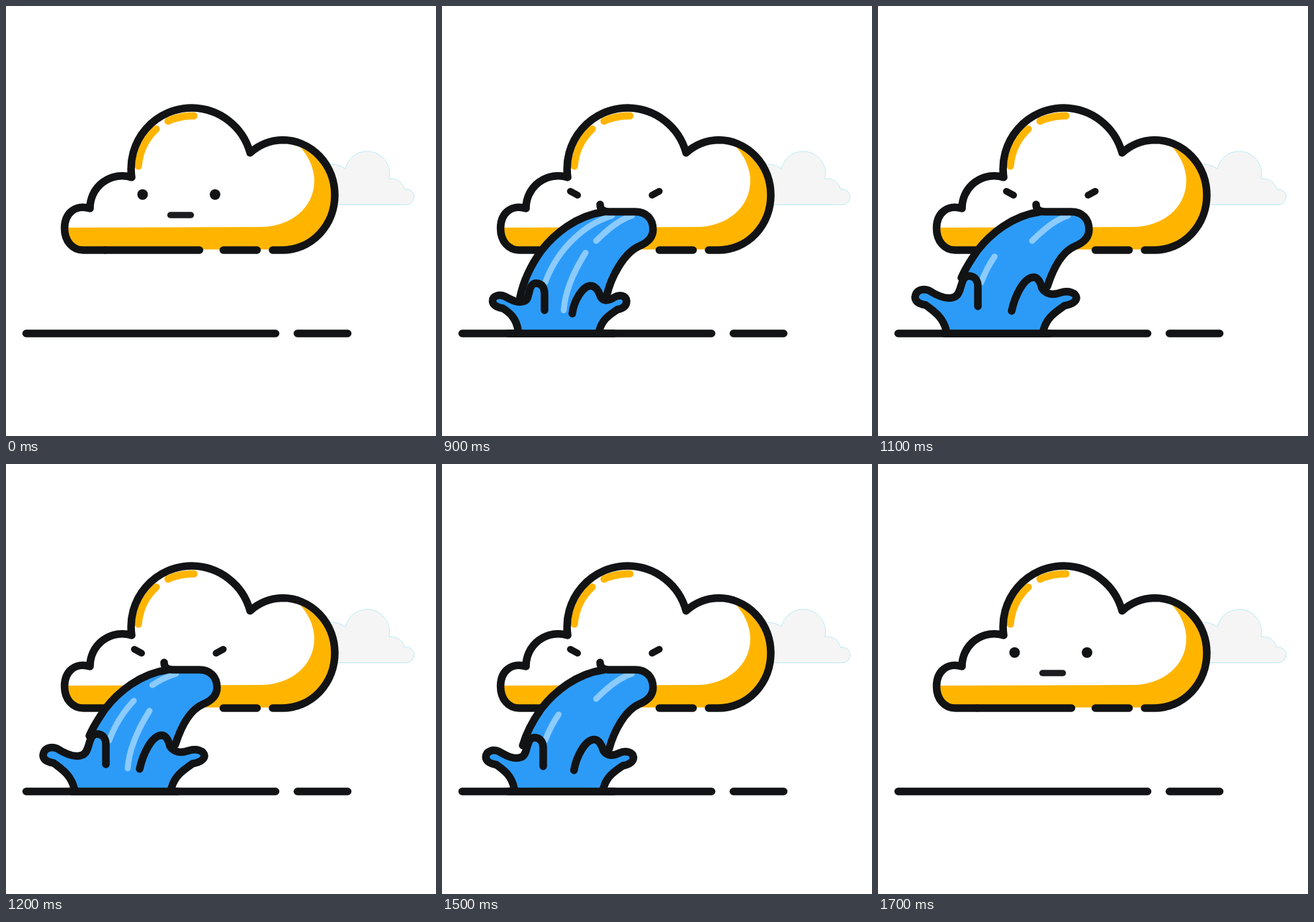
An HTML page that plays this animation: 650 px wide and 650 px high, repeating every 1.9 s.

```html
<!DOCTYPE html>
<html lang="en">
<head>
<meta charset="utf-8">
<title>Rain cloud</title>
<style>
  html, body { margin: 0; width: 100%; height: 100%; overflow: hidden; background: #fff; }
  svg { display: block; width: 100vw; height: 100vh; }
  .ink { stroke: #121314; stroke-width: 11.5; }
  .line { fill: none; stroke-linecap: round; stroke-linejoin: round; }
  .sun { stroke: #ffb500; stroke-width: 11; }
  .shine { stroke: #8bcbff; stroke-width: 9; }
  .water { fill: #2c9bf8; }
</style>
</head>
<body>
<svg viewBox="0 0 650 650">
  <path fill="#f5f5f5" stroke="#8fe0ee" stroke-width=".6"
    d="M490 300.500H605A12 12 0 0 0 617 288C617 281 610 276 602.500 277A21 21 0 0 0 579 261A33.500 33.500 0 1 0 513 246Q503 239 490 239Z"/>

  <path fill="#fff" d="M117 368C100 369 88.500 355 88.500 336C88.500 312 106 299.500 127 306A48.500 48.500 0 0 1 190 259A92 92 0 0 1 281 154A92 92 0 0 1 369 222Q390 203 418 202.600A79 83 0 0 1 418 368Z"/>
  <path fill="#ffb500" d="M89 335L385 334C430 334 466 305 466 264C466 243 455 221 437 206A79 83 0 0 1 418 368H117C100 368 89 355 89 335Z"/>
  <g class="line sun">
    <path d="M200 242Q203 208 227 186"/>
    <path d="M245 174Q262 166 284 166"/>
  </g>
  <g class="line ink">
    <path d="M150 369H117C100 369 88.500 355 88.500 336C88.500 312 106 299.500 127 306A48.500 48.500 0 0 1 190 259A92 92 0 0 1 281 154A92 92 0 0 1 369 222A79 83 0 0 1 418 202.600A79 83 0 0 1 497 285.700A79 83 0 0 1 418 369H403"/>
    <path d="M328.500 369H379.500"/>
    <path d="M30.500 495H407.500M440.500 495H516.500"/>
  </g>

  <g id="eyes" fill="#121314">
    <circle cx="206.500" cy="285" r="8"/>
    <circle cx="316" cy="285" r="8"/>
  </g>
  <path id="brows" class="line ink" style="stroke-width:10" d="M194 280L205 286M317.500 286L328.500 280"/>
  <g id="closed" class="line ink">
    <path d="M150 369H292.500"/>
    <path style="stroke-width:9.500;stroke:#1c1c1e" d="M248.500 316H279.500"/>
  </g>

  <g id="rain">
    <path id="body" class="water"/>
    <path id="splashFill" class="water"/>
    <g id="shines" class="line shine"></g>
    <path id="edges" class="line ink"/>
    <path id="splash" class="line ink"/>
    <path class="line ink" d="M100 495H260"/>
  </g>
</svg>
<script>
const LOOP = 1900;
const $ = id => document.getElementById(id);

const small = {
  left: "M115 490C112 472 103 464 92 457C80 455 76 450 76.5 445C77 438 87 435 95 439C106 445 115 450 125 446C134 442 129 420 142 419C152 419 155 427 155 436L155 460",
  right: "M238 490C243 472 255 466 265 459C275 457 279 452 279 446C278 437 268 436 261 440C252 446 244 447 240 440C236 428 231 422 223 423C212 425 199 446 197 465",
  flowL: "M245 311C203 317 170 344 150 370C135 391 123 416 118 440",
  flowR: "C274 374 255 411 249 438"
};
const big = {
  left: "M103 490C98 470 85 462 72 452C60 450 56 445 56 440C57 430 67 426 77 430C88 437 103 445 115 440C128 436 123 409 137 408C148 408 151 417 151 424L151 454",
  right: "M250 490C255 472 266 464 282 453C294 451 300 446 300 441C299 433 288 430 277 433C265 437 255 437 248 427C245 415 241 410 235 410C220 411 207 438 202 461",
  flowL: "M245 311C203 317 170 344 150 370C141 383 132 396 126 411",
  flowR: "C279 371 265 396 256 424"
};
const lip = "M239 300C239 307 243 311 252 311H292C309 311 319 322 319 338C319 351 310 358 298 363";

// Blend two path strings of the same structure.
function mix(a, b, k) {
  const ends = b.match(/[\d.]+/g);
  let i = 0;
  return a.replace(/[\d.]+/g, n => +n + (ends[i++] - n) * k);
}

// Highlight tracks; each streak is [track, from %, to %].
const tracks = [
  "M257 317C220 328 176 363 156 418",
  "M287 317C265 324 246 342 233 355",
  "M217 373C200 400 186 430 184 460"
];
const full = [[0, 0, 100], [1, 0, 100], [2, 0, 100]];
const broken = [[0, 0, 27], [0, 52, 100], [2, 0, 100]];
const sparse = [[0, 70, 100], [1, 0, 100]];

// Start time, splash size (0 small, 1 big), streaks.
const poses = [
  [900, 0, full],
  [1000, 0.5, broken],
  [1100, 1, sparse],
  [1200, 1, broken],
  [1400, 0, broken],
  [1500, 0.5, sparse],
  [1600, 0, full]
];

function drawRain(size, streaks) {
  const p = {};
  for (const key in small) p[key] = mix(small[key], big[key], size);
  p.right = p.right.trim();
  const flow = lip + p.flowR;
  $("body").setAttribute("d", flow + "L235 490H125L" + p.flowL.split(/[ C]/).slice(-2).join(" ")
    + "C123 416 135 391 150 370C170 344 203 317 245 311Z");
  $("splashFill").setAttribute("d", p.left + "L180 490Z" + p.right + "L180 490Z");
  $("edges").setAttribute("d", flow + p.flowL);
  $("splash").setAttribute("d", p.left + p.right);
  $("shines").innerHTML = streaks.map(([n, a, b]) =>
    `<path d="${tracks[n]}" pathLength="100" stroke-dasharray="${b - a} 300" stroke-dashoffset="${-a}"/>`).join("");
}

const show = (id, on) => { $(id).style.display = on ? "" : "none"; };
const start = performance.now();
let last;

function frame() {
  const t = (performance.now() - start) % LOOP;
  const angry = t >= 500 && t < 1700;
  const raining = t >= 900 && t < 1700;
  show("eyes", !angry);
  show("brows", angry);
  show("closed", !raining);
  show("rain", raining);
  const pose = raining && poses.filter(p => p[0] <= t).pop();
  if (pose && pose !== last) drawRain(pose[1], pose[2]);
  last = pose;
  requestAnimationFrame(frame);
}
frame();
</script>
</body>
</html>
```
